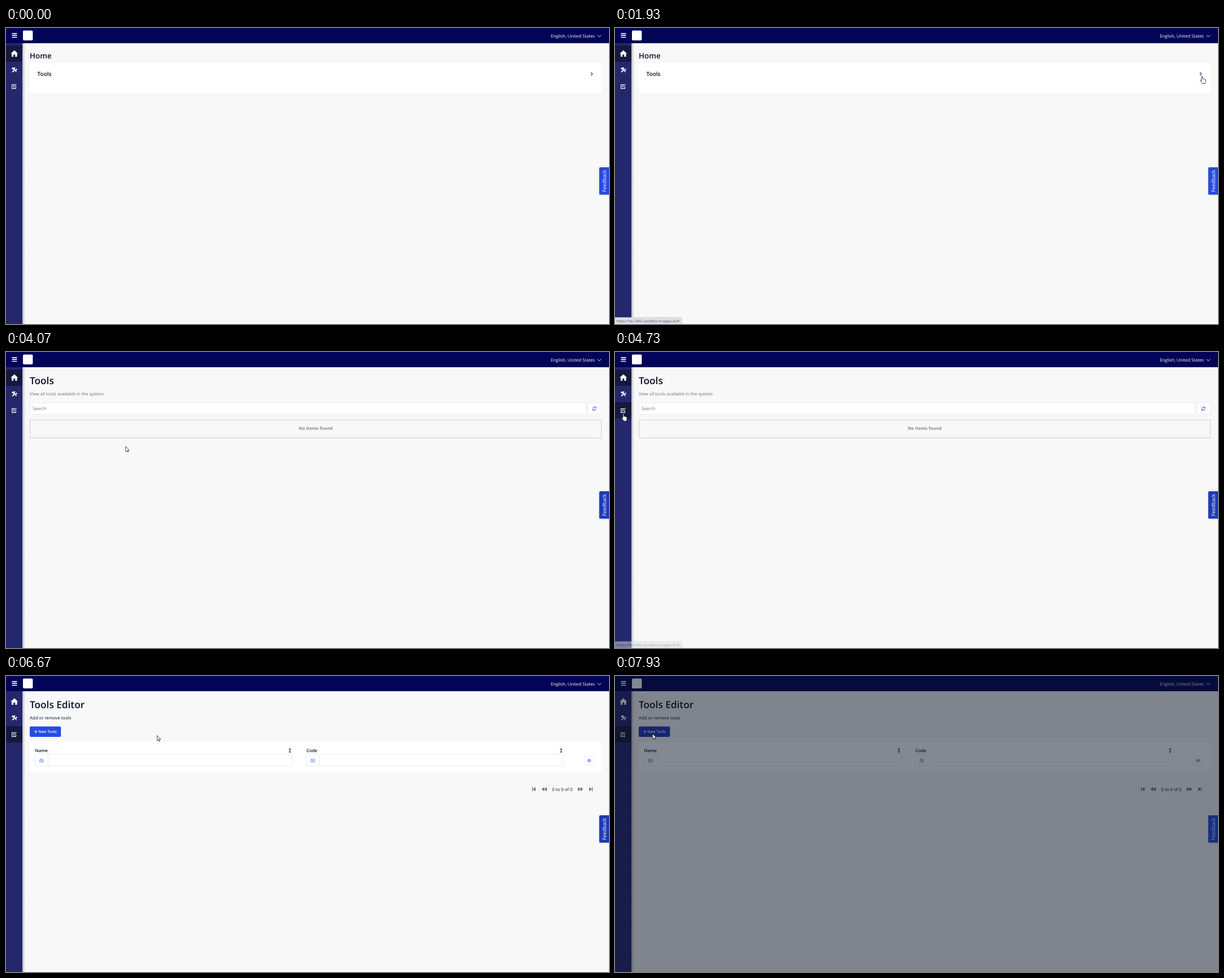
An HTML page for the animation above (8000 ms loop, 1067 px wide and 525 px high).

```html
<!DOCTYPE html>
<html lang="en">
<head>
<meta charset="utf-8">
<title>Tools walkthrough</title>
<style>
  html, body { margin: 0; width: 100%; height: 100%; overflow: hidden; background: #f8f8f8; }
  svg { display: block; width: 100vw; height: 100vh; }
  text { font: 7.78px 'Open Sans', sans-serif; fill: #0a1325; text-rendering: geometricPrecision; white-space: pre; }
  .h1 { font-size: 17.23px; font-weight: 600; }
  .h2 { font-size: 13.33px; font-weight: 600; }
  .h4 { font-size: 10px; font-weight: 600; }
  .bold { font-weight: 600; }
  .muted { fill: #6c717e; }
  .white { fill: #fff; }
  .field { fill: #fff; stroke: #e5e6e9; stroke-width: .8; }
  .line { fill: none; stroke: #fff; }
  .blue { fill: none; stroke: #264ae5; }
  .pointer { fill: #fff; stroke: #1c1c1c; stroke-width: .8; stroke-linejoin: round; }
</style>
</head>
<body>
<svg viewBox="0 0 1067 525">
  <defs>
    <linearGradient id="shade">
      <stop stop-color="#000" stop-opacity=".25"/>
      <stop offset="1" stop-color="#000" stop-opacity="0"/>
    </linearGradient>
    <g id="filter">
      <path d="M502.3 129v6.4M500.6 130.4l1.7-1.9 1.7 1.9M500.6 134l1.7 1.9 1.7-1.9" fill="none" stroke="#0a1325" stroke-width=".9"/>
      <rect class="field" x="51.4" y="139" width="455" height="20.6" rx="1.5"/>
      <path d="M74.4 139v20.6" stroke="#e5e6e9" stroke-width=".8"/>
      <text x="58.8" y="151.3" style="font-size:6.67px;fill:#264ae5;text-decoration:underline">Ab</text>
    </g>
    <g id="skip" fill="#70737c">
      <path d="M931 197h1.2v7.4H931zM937 197v7.4l-4.6-3.7zM952.4 197v7.4l-4.6-3.7zM957 197v7.4l-4.6-3.7z"/>
    </g>
  </defs>

  <rect width="1067" height="525" fill="#f8f8f8"/>

  <g id="home">
    <text class="h2" x="42" y="53.6">Home</text>
    <rect x="42" y="62" width="1012" height="53" fill="#fff"/>
    <text class="h4" x="55.6" y="85">Tools</text>
    <path id="chevron" class="blue" d="M1034.9 78.8l2.9 2.8-2.9 2.8" stroke-width="1.3"/>
  </g>

  <g id="list">
    <text class="h1" x="42" y="57.4">Tools</text>
    <text class="muted" x="42" y="76.6">View all tools available in the system</text>
    <rect class="field" x="42.4" y="90" width="984" height="20.8" rx="1.5"/>
    <text class="muted" x="47" y="103.2">Search</text>
    <rect class="field" x="1029.6" y="90" width="23.8" height="20.8" rx="1.5"/>
    <path class="blue" d="M1038.3 99.8a2.9 2.9 0 0 1 5.3-1M1044.1 97.3v2.1h-2.1M1044 101.2a2.9 2.9 0 0 1-5.3 1M1038.2 103.7v-2.1h2.1" stroke-width="1"/>
    <rect x="42.4" y="120.4" width="1011" height="32" fill="none" stroke="#ccc" stroke-width=".9"/>
    <text x="548" y="137.7" text-anchor="middle" style="font-weight:700;fill:#8a8a8a">No items found</text>
  </g>

  <g id="editor">
    <text class="h1" x="42" y="57.4">Tools Editor</text>
    <text x="42" y="76.6">Add or remove tools</text>
    <rect id="add" x="42" y="89.5" width="55.2" height="18.6" rx="2"/>
    <path class="line" d="M50 98.8h5.6M52.8 96v5.6" stroke-width=".9"/>
    <text class="white bold" x="57.2" y="101.2" style="font-size:6.67px">New Tools</text>
    <rect x="42" y="117" width="1012" height="52" fill="#fff"/>
    <text class="bold" x="51.6" y="135">Name</text>
    <text class="bold" x="531.8" y="135">Code</text>
    <use href="#filter"/>
    <use href="#filter" x="480"/>
    <rect class="field" x="1023.8" y="141.8" width="16.6" height="16.4" rx="2"/>
    <path class="blue" d="M1028.4 150q3.6-4.6 7.2 0q-3.6 4.6-7.2 0z" stroke-width=".8"/>
    <circle class="blue" cx="1032" cy="150" r="1.1" stroke-width=".7"/>
    <use href="#skip"/>
    <use href="#skip" transform="matrix(-1 0 0 1 1969 0)"/>
    <text x="966.3" y="203.7">0 to 0 of 0</text>
  </g>

  <g id="sidebar">
    <rect x="29" y="27" width="5" height="498" fill="url(#shade)"/>
    <rect y="27" width="29" height="498" fill="#24276c"/>
    <rect id="homeItem" y="31" width="29" height="29" fill="#16183f"/>
    <rect id="editItem" y="89" width="29" height="29" fill="#16183f"/>
    <path class="white" d="M14.8 39.4l6.5 6h-1.7v5.7h-3.3v-4h-3v4H10v-5.7H8.3z"/>
    <path class="line" d="M12.4 72l6.2 6.2M10.4 72.6l2.9-2.5M11.2 78.2l5-4.8M18.8 72.4a2.2 2.2 0 1 1-2.5-2" stroke-width="1.9"/>
    <path d="M13.8 73.7l4.4 4.3" stroke="#24276c" stroke-width=".5"/>
    <path class="line" d="M15.4 100.6H10.6v6.8h6.8v-3.6" stroke-width="1.1"/>
    <path class="line" d="M13 105l.4-1.8 3.8-3.8 1.3 1.3-3.8 3.8z" stroke-width="1"/>
  </g>

  <g id="topbar">
    <rect width="1067" height="27" fill="#020557"/>
    <path class="line" d="M10.6 9.9h8.8M10.6 13.2h8.8M10.6 16.5h8.8" stroke-width="1.7"/>
    <rect class="white" x="30" y="4.6" width="17.4" height="17.4" rx="2"/>
    <text class="white" x="964" y="16.8">English, United States</text>
    <path class="line" d="M1046.6 12.7l3.2 3.1 3.2-3.1" stroke-width=".9"/>
  </g>

  <rect x="1049" y="247" width="20" height="49.4" rx="2.5" fill="#000" opacity=".18"/>
  <rect id="feedback" x="1049.8" y="247" width="20" height="48.4" rx="2"/>
  <text class="white" transform="translate(1061.6 291) rotate(-90)" style="font-size:8.89px">Feedback</text>

  <g id="status">
    <path d="M-1 526V513.4H116q2 0 2 2V526z" fill="#dee1e6" stroke="#c4c8d0" stroke-width=".7"/>
    <text x="2.6" y="521.7" style="font-size:6.33px;fill:#4a4e58">https://tw-2405-sandbox.mxapps.io/#</text>
  </g>

  <rect id="dim" width="1067" height="525" fill="#0a1325" opacity=".5"/>

  <g id="cursor">
    <path id="arrow" class="pointer" d="M.4.4V9.6L2.5 7.7 3.9 10.8 5.2 10.2 3.9 7.2H6.7z"/>
    <path id="hand" class="pointer" transform="translate(-3)" d="M3 8.4V1.3Q3 .5 3.9.5T4.8 1.3V5Q6.3 4.5 6.6 5.6Q8 5 8.4 6.1Q9.9 5.7 10 7V9.6Q10 11.6 9.1 13.5H4.4Q3.5 11.3 1 8.6Q.2 7.4 1.2 7.1Q2 7 3 8.4z"/>
  </g>
</svg>
<script>
const LOOP = 8000, FPS = 15;
const $ = id => document.getElementById(id);
const show = (id, on) => $(id).style.display = on ? '' : 'none';
const within = (t, from, to) => t >= from && t < to;

// Pointer tip: time, x, y
const path = [
  [200, 131, 336], [400, 616, 115], [600, 616, 115], [733, 950, 20], [800, 1059, 28],
  [1000, 1059, 28], [1667, 1038, 85], [2667, 1038, 85], [3200, 610, 134], [3533, 569, 150],
  [4000, 250, 177], [4400, 20, 117], [4467, 14, 109], [4933, 14, 109], [5200, 522, 84],
  [5467, 522, 84], [5600, 517, 123], [5933, 517, 123], [6200, 398, 104], [6400, 398, 104],
  [7067, 71, 107], [7333, 71, 107], [7467, 67, 102], [7867, 67, 102], [7933, 66, 102]
];

function pointerAt(t) {
  const i = path.findIndex(key => key[0] > t);
  if (i < 0) return path.at(-1).slice(1);
  if (i === 0) return path[0].slice(1);
  const [t0, x0, y0] = path[i - 1], [t1, x1, y1] = path[i];
  const k = (t - t0) / (t1 - t0);
  return [x0 + (x1 - x0) * k, y0 + (y1 - y0) * k];
}

// Fades in over the 133 ms after `from`, out over the 133 ms after `to`
const fade = (t, from, to) =>
  Math.max(0, Math.min(1, (t - from) / 133, 1 - (t - to) / 133));

function draw(ms) {
  const t = Math.round(Math.floor((ms % LOOP) * FPS / 1000 + .07) * 1000 / FPS);
  const page = t < 2267 ? 'home' : t < 4867 ? 'list' : 'editor';
  for (const name of ['home', 'list', 'editor']) show(name, name === page);

  const [x, y] = pointerAt(t);
  const modal = t >= 7933;
  const onAdd = page === 'editor' && within(x, 42, 97) && within(y, 89, 109);
  const hand = within(t, 1600, 3333) || within(t, 4467, 5000) || (onAdd && !modal);

  show('cursor', t >= 200);
  show('hand', hand);
  show('arrow', !hand);
  $('cursor').setAttribute('transform', `translate(${x} ${y})`);

  show('homeItem', page !== 'editor');
  show('editItem', t >= 4467);
  show('dim', modal);
  $('chevron').style.stroke = hand ? '#1e3bb7' : '#264ae5';
  $('add').style.fill = onAdd ? '#1e3bb7' : '#264ae5';
  $('feedback').style.fill = within(t, 2200, 7800) ? '#1e3bb7' : '#264ae5';
  $('status').style.opacity = Math.max(fade(t, 1800, 3000), fade(t, 4667, 5400));
}

function tick() {
  draw(performance.now());
  requestAnimationFrame(tick);
}
tick();
</script>
</body>
</html>
```
